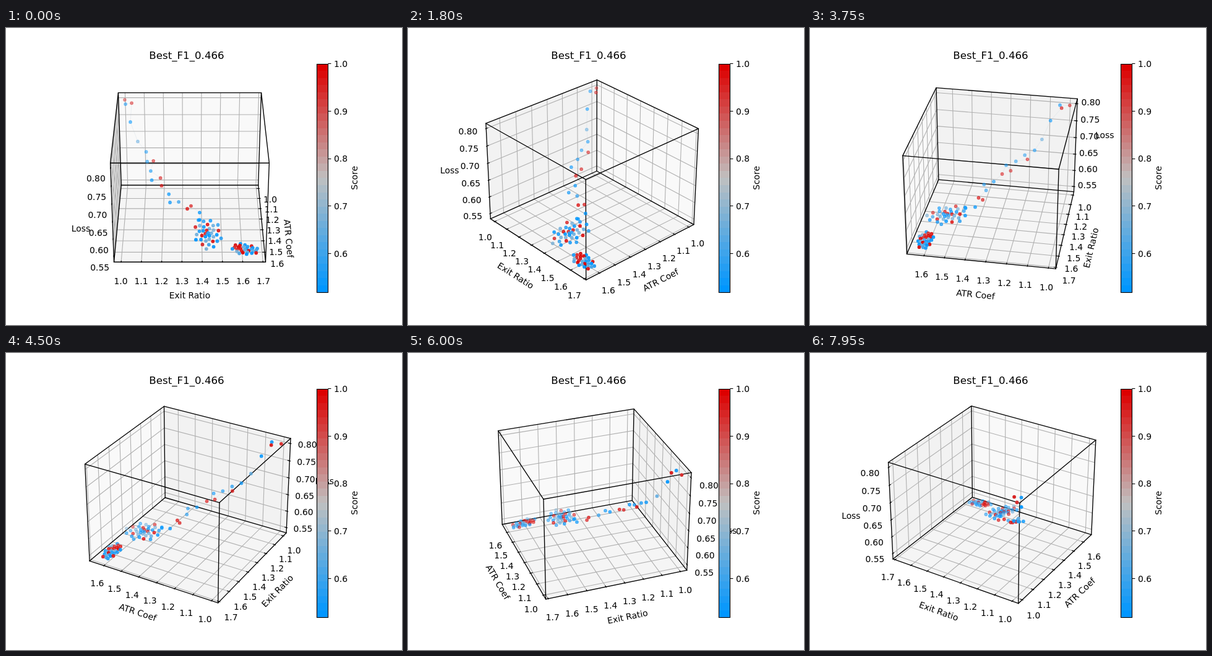
Write an HTML page that moves like this. It is 640x480 px and loops after 8000 ms.

```html
<!DOCTYPE html>
<html lang="en">
<head>
<meta charset="utf-8">
<title>Score scatter</title>
<style>
  html, body { margin: 0; width: 100%; height: 100%; overflow: hidden; background: #fff; }
  svg { display: block; width: 640px; height: 480px; font: 13.89px "DejaVu Sans", sans-serif; }
  .mid { text-anchor: middle; }
  .thin { fill: none; stroke: #000; stroke-width: 1.11; }
  .grid { fill: none; stroke: #b0b0b0; stroke-width: 1.11; }
  .box { fill: none; stroke: #000; stroke-width: 1.35; stroke-linecap: round; }
  .trail { fill: none; stroke: #8fa8c0; stroke-opacity: .14; stroke-width: 1; }
</style>
</head>
<body>
<svg viewBox="0 0 640 480">
  <rect width="640" height="480" fill="#fff"/>
  <g id="plot"></g>
  <g id="bar"></g>
  <text class="mid" x="292" y="49.6" font-size="16.67">Best_F1_0.466</text>
</svg>
<script>
const STEP = 150, LOOP = 8000, TURN = 4;
const HALF = [0.5952, 0.5952, 0.4464];
const ELEV = Math.PI / 6, DIST = 10, SCALE = 1997.8, CX = 297, CY = 237.4;

const AXES = [
  { name: 'ATR Coef', lo: 0.965, hi: 1.684, from: 1.0, step: 0.1, count: 7, digits: 1 },
  { name: 'Exit Ratio', lo: 0.9646, hi: 1.7126, from: 1.0, step: 0.1, count: 8, digits: 1 },
  { name: 'Loss', lo: 0.5336, hi: 0.8144, from: 0.55, step: 0.05, count: 6, digits: 2 }
];

let seed = 11;
const rand = () => (seed = seed * 16807 % 2147483647) / 2147483647;

// Loss falls along the floor diagonal, steeper near the start
function lossAt(x, y) {
  const s = x + y;
  return Math.min(0.408, 0.34 * Math.exp(-0.909 * s) - 0.55 + 0.9 * Math.max(0, -0.8 - s));
}
const place = (x, y, score) => ({ pos: [x, y, lossAt(x, y)], score });
const hotScore = () => 0.94 + rand() * 0.06;
const coolScore = () => 0.52 + rand() ** 2 * 0.16;

// Search path on the floor in hundredths of a box unit; R marks a high score
const PATH = '-54,-54R -46,-53 -48,-48R -39,-49 -33,-43 -28,-36 -20,-35 -23,-30R -13,-32 '
  + '-10,-24R -5,-31 -3,-23R 3,-17 11,-16 8,-9 13,-2R 9,1R 14,8 22,8';
const trail = PATH.split(' ').map(k => {
  const [x, y] = k.split(',').map(v => parseInt(v, 10) / 100);
  return place(x, y, k.endsWith('R') ? hotScore() : coolScore());
});

// Golden-angle spiral filling an ellipse; a larger power packs the core
function blob(count, cx, cy, rx, ry, power, hot) {
  return Array.from({ length: count }, (_, k) => {
    const r = ((k + 0.5) / count) ** power, a = k * 2.4;
    const score = rand() < hot ? hotScore() : coolScore();
    return place(cx + rx * r * Math.cos(a), cy + ry * r * Math.sin(a), score);
  });
}
const points = [
  ...trail,
  ...blob(36, 0.36, 0.14, 0.18, 0.12, 0.75, 0.28),
  ...blob(28, 0.48, 0.435, 0.065, 0.11, 0.5, 0.36)
];

const BLUE = [0, 150, 255], GREY = [192, 192, 192], RED = [221, 0, 0];
const V_MIN = 0.5184;
function ramp(t) {
  const [a, b, k] = t < 0.5 ? [BLUE, GREY, t * 2] : [GREY, RED, t * 2 - 1];
  return `rgb(${a.map((v, i) => Math.round(v + (b[i] - v) * k))})`;
}
const scoreColor = s => ramp(Math.max(0, Math.min(1, (s - V_MIN) / (1 - V_MIN))));

const n = v => v.toFixed(2);
const path = (pts, cls, extra = '') =>
  `<path class="${cls}" d="M${pts.map(p => n(p.x) + ' ' + n(p.y)).join('L')}" ${extra}/>`;
const text = (x, y, s, cls = 'mid', extra = '') =>
  `<text class="${cls}" x="${n(x)}" y="${n(y)}" ${extra}>${s}</text>`;

function camera(azim) {
  const c = Math.cos(azim), s = Math.sin(azim), ce = Math.cos(ELEV), se = Math.sin(ELEV);
  return ([x, y, z]) => {
    const near = x * c + y * s;
    const depth = DIST - near * ce - z * se;
    const k = SCALE / depth;
    return { x: CX + (y * c - x * s) * k, y: CY - (z * ce - near * se) * k, depth };
  };
}

function ticks(i) {
  const a = AXES[i];
  return Array.from({ length: a.count }, (_, k) => {
    const v = a.from + k * a.step;
    return { label: v.toFixed(a.digits), at: ((v - a.lo) / (a.hi - a.lo) * 2 - 1) * HALF[i] };
  });
}

function drawAxis(i, front, view) {
  // Signs of the edge that carries the axis
  const side = [[0, front[1], -1], [front[0], 0, -1], [front[0], -front[1], 0]][i];
  const along = (at, push) => HALF.map((h, k) => k === i ? at : side[k] * h * (1 + 2 * push));
  const dir = i === 0 ? 1 : 0;
  let out = '';
  for (const { label, at } of ticks(i)) {
    const ends = [0.1, -0.2].map(f => {
      const p = along(at, 0);
      p[dir] += side[dir] * f * 0.16 * HALF[dir];
      return view(p);
    });
    const l = view(along(at, 0.0864));
    out += path(ends, 'thin') + text(l.x, l.y + 10.4, label);
  }
  const m = view(along(0, 0.1879));
  let turn = 0;
  if (i < 2) {
    const a = view(along(-HALF[i], 0)), b = view(along(HALF[i], 0));
    turn = Math.atan((b.y - a.y) / (b.x - a.x)) * 180 / Math.PI;
  }
  return out + text(m.x, m.y + 3.8, AXES[i].name, 'mid',
    `transform="rotate(${n(turn)} ${n(m.x)} ${n(m.y)})"`);
}

function drawPanes(front, view) {
  const [X, Y, Z] = HALF, bx = -front[0] * X, by = -front[1] * Y;
  const pane = (pts, fill) => path(pts.map(view), 'pane', `fill="${fill}"`);
  let out = pane([[bx, -Y, -Z], [bx, Y, -Z], [bx, Y, Z], [bx, -Y, Z]], '#f9f9f9')
    + pane([[-X, by, -Z], [X, by, -Z], [X, by, Z], [-X, by, Z]], '#f2f2f2')
    + pane([[-X, -Y, -Z], [X, -Y, -Z], [X, Y, -Z], [-X, Y, -Z]], '#f5f5f5');
  const rule = [
    t => [[t, -by, -Z], [t, by, -Z], [t, by, Z]],
    t => [[-bx, t, -Z], [bx, t, -Z], [bx, t, Z]],
    t => [[-bx, by, t], [bx, by, t], [bx, -by, t]]
  ];
  rule.forEach((f, i) => ticks(i).forEach(t => { out += path(f(t.at).map(view), 'grid'); }));
  return out;
}

function drawBox(view) {
  let out = '';
  for (let i = 0; i < 3; i++)
    for (const a of [-1, 1])
      for (const b of [-1, 1]) {
        const end = s => {
          const p = [];
          p[i] = s * HALF[i];
          p[(i + 1) % 3] = a * HALF[(i + 1) % 3];
          p[(i + 2) % 3] = b * HALF[(i + 2) % 3];
          return view(p);
        };
        out += path([end(-1), end(1)], 'box');
      }
  return out;
}

function drawPoints(view) {
  const dots = points.map(p => ({ ...view(p.pos), fill: scoreColor(p.score) }));
  dots.sort((a, b) => b.depth - a.depth);
  const far = dots[0].depth, near = dots[dots.length - 1].depth;
  return dots.map(d => {
    const alpha = n(1 - 0.58 * (d.depth - near) / (far - near));
    return `<circle cx="${n(d.x)}" cy="${n(d.y)}" r="2.2" fill="${d.fill}" stroke="${d.fill}"
      stroke-width="1.39" fill-opacity="${alpha}" stroke-opacity="${alpha}"/>`;
  }).join('');
}

function scene(step) {
  const azim = step * TURN * Math.PI / 180;
  const view = camera(azim);
  const front = [Math.cos(azim) >= 0 ? 1 : -1, Math.sin(azim) >= 0 ? 1 : -1];
  return drawPanes(front, view)
    + [0, 1, 2].map(i => drawAxis(i, front, view)).join('')
    + drawBox(view)
    + path(trail.map(p => view(p.pos)), 'trail')
    + drawPoints(view);
}

function colorBar() {
  const left = 502, width = 18.5, top = 57.6, height = 369.6, bands = 32;
  let out = '';
  for (let i = 0; i < bands; i++)
    out += `<rect x="${left}" y="${n(top + i * height / bands)}" width="${width}"
      height="${n(height / bands + 0.5)}" fill="${ramp(1 - i / (bands - 1))}" shape-rendering="crispEdges"/>`;
  out += `<rect class="thin" x="${left + 0.5}" y="58.5" width="18" height="369"/>`;
  for (let v = 6; v <= 10; v++) {
    const y = top + (1 - v / 10) / (1 - V_MIN) * height;
    const snap = Math.floor(y) + 0.5;
    out += path([{ x: 520.5, y: snap }, { x: 525.4, y: snap }], 'thin')
      + text(530, y + 5.3, (v / 10).toFixed(1), '');
  }
  return out + text(568, 242.4, 'Score', 'mid', 'transform="rotate(-90 568 242.4)"');
}

const plot = document.getElementById('plot');
document.getElementById('bar').innerHTML = colorBar();
let shown = -1;
function tick() {
  const step = Math.floor(performance.now() % LOOP / STEP);
  if (step !== shown) plot.innerHTML = scene(shown = step);
  requestAnimationFrame(tick);
}
tick();
</script>
</body>
</html>
```
